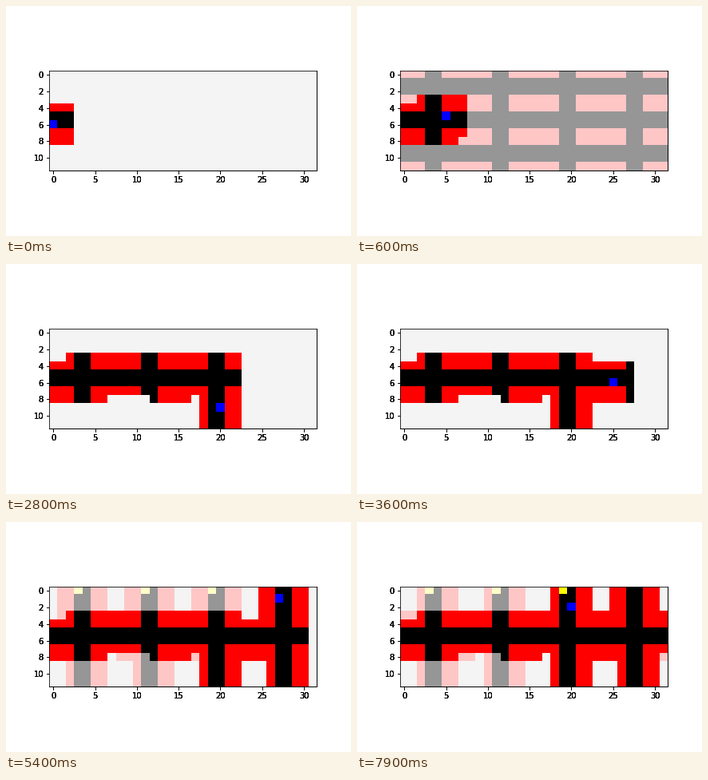
These frames come from a looping animation (432 by 288 pixels, 8 s). A matplotlib script:

```python
import numpy as np
import matplotlib.pyplot as plt
from matplotlib.animation import FuncAnimation
from matplotlib.colors import ListedColormap

ROWS, COLS, PERIOD = 12, 32, 8
SIGHT = 2
UNKNOWN, WALL, ROAD, GOAL, AGENT = 0, 1, 2, 3, 7
DIM = 3  # offset from an observed cell to its predicted shade
COLORS = ["#f4f4f4", "#ff0000", "#000000", "#ffff00",
          "#ffc6c6", "#969696", "#ffffc8", "#0000ff"]

STEP = {"R": (0, 1), "L": (0, -1), "U": (-1, 0), "D": (1, 0), ".": (0, 0)}
MOVES = ("R" * 4 + "U" + "R" * 10 + "DU" + "RR." + "R" * 4 + "D" * 4 + "UUU"
         + "R" * 8 + "DDD" + "U" * 9 + "L.D." + "RDLDRDLDR" + "R."
         + "LLL." + "L" * 6 + "UUU")


def make_world():
    world = np.full((ROWS, COLS), WALL)
    world[:, [c for c in range(COLS) if c % PERIOD in (3, 4)]] = ROAD
    world[5:7] = ROAD
    world[0, [19, 27]] = GOAL
    return world


def predict(world, seen, goal_col):
    """Repeat a known tile over the map, or return None."""
    if goal_col is not None:
        left = goal_col // PERIOD * PERIOD
        known = np.where(seen, world, UNKNOWN)
        return np.tile(known[:, left:left + PERIOD], (1, COLS // PERIOD))
    if not seen[4:8, :PERIOD].all():
        return None
    guess = np.tile(world[4:8, :PERIOD], (ROWS // 4, COLS // PERIOD))
    return guess if (guess == world)[seen].all() else None


def explore():
    world = make_world()
    seen = np.zeros(world.shape, bool)
    visited = seen.copy()
    row, col = 6, 0
    goal_col = None
    views = []
    for move in "." + MOVES:
        row, col = row + STEP[move][0], col + STEP[move][1]
        near = np.s_[max(row - SIGHT, 0):row + SIGHT + 1,
                     max(col - SIGHT, 0):col + SIGHT + 1]
        fresh = np.zeros_like(seen)
        fresh[near] = True
        fresh &= ~seen
        seen |= fresh
        visited[row, col] = True
        found = np.argwhere(fresh & (world == GOAL))
        if len(found):
            goal_col = found[0][1]

        view = np.where(seen, world, UNKNOWN)
        view[visited] = ROAD
        guess = predict(world, seen, goal_col)
        if guess is not None:
            fill = ~seen & (guess != UNKNOWN)
            view[fill] = guess[fill] + DIM
        view[row, col] = AGENT
        views.append(view)
    return views


views = explore()

plt.rcParams.update({"font.family": "DejaVu Sans", "font.size": 10})
fig = plt.figure(figsize=(6, 4), dpi=72, facecolor="white")
fig.subplots_adjust(left=0.125, right=0.9, bottom=0.125, top=0.88)

# Stacked axes give the tick labels their heavy edges.
for _ in range(4):
    ax = fig.add_subplot()
    image = ax.imshow(views[0], cmap=ListedColormap(COLORS), vmin=-0.5,
                      vmax=len(COLORS) - 0.5, interpolation="nearest")
    ax.set_xticks(range(0, COLS, 5))
    ax.set_yticks(range(0, ROWS, 2))


def draw(i):
    image.set_data(views[i])
    return [image]


anim = FuncAnimation(fig, draw, frames=len(views), interval=100, repeat=True,
                     repeat_delay=0)
plt.show()
```
